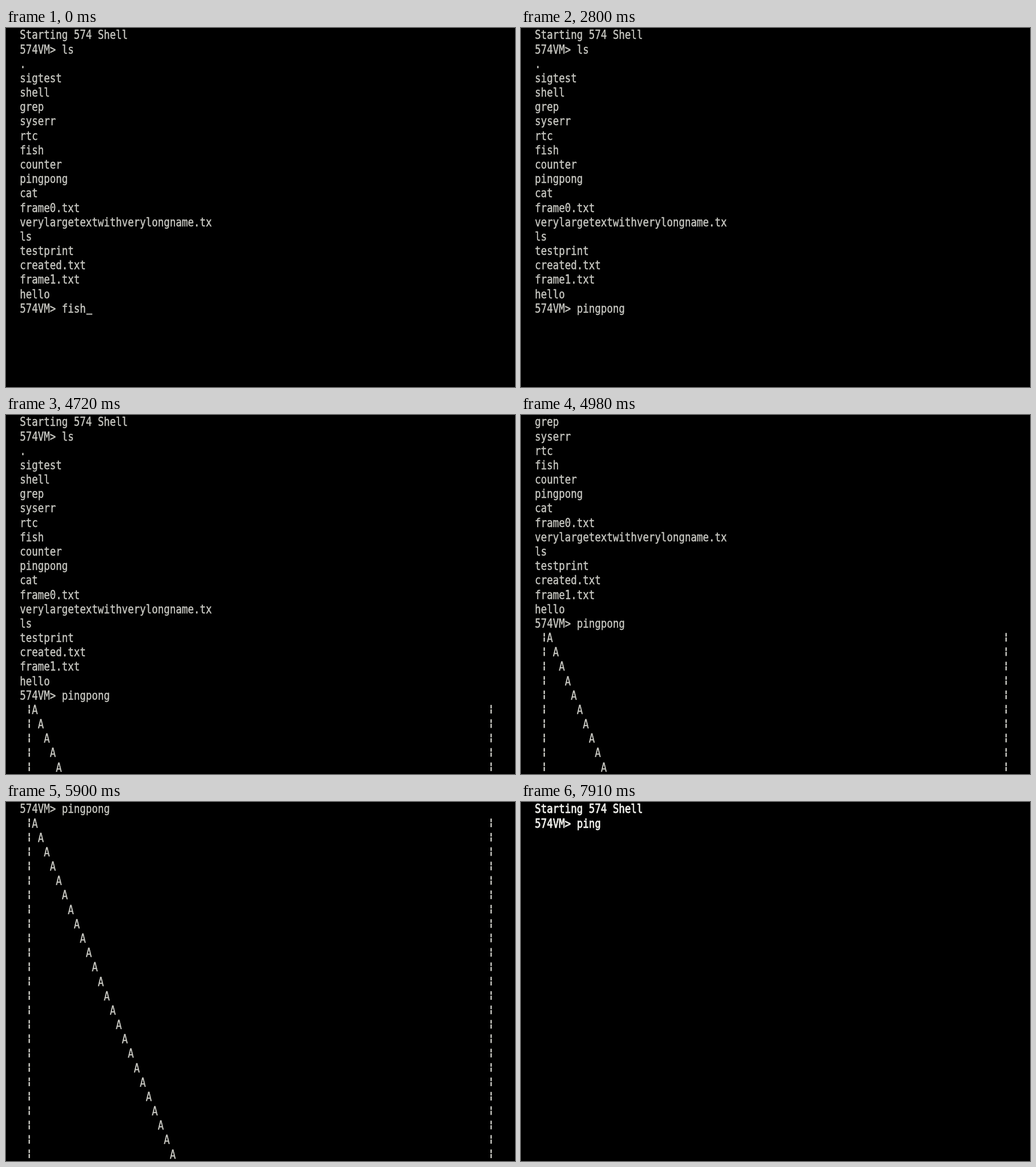
These frames come from a looping animation (891x628 px, 8000 ms). An HTML page with a canvas:

```html
<!DOCTYPE html>
<html lang="en">
<head>
<meta charset="utf-8">
<title>Terminal</title>
<style>
  html, body { margin: 0; width: 100%; height: 100%; overflow: hidden; background: #000; }
  canvas { display: block; }
</style>
</head>
<body>
<canvas id="screen" width="891" height="628"></canvas>
<script>
const ctx = document.getElementById('screen').getContext('2d');

const LOOP = 8000;
const LEFT = 24.3, CELL = 10.5, ROW = 25.17, TOP = 0.6;
const ROWS = 25, TALL = 1.23, DOT = ROW / 16;
const SWITCH = 6460;          // second terminal comes up

const banner = 'Starting 574 Shell';
const prompt = '574VM> ';
const listing = [
  banner, prompt + 'ls', '.', 'sigtest', 'shell', 'grep', 'syserr', 'rtc',
  'fish', 'counter', 'pingpong', 'cat', 'frame0.txt',
  'verylargetextwithverylongname.tx', 'ls', 'testprint', 'created.txt',
  'frame1.txt', 'hello'
];

// [time, text at the prompt]
const firstTyping = [
  [0, 'fish'], [220, 'fis'], [370, 'fi'], [520, 'f'], [670, ''],
  [900, 'p'], [1100, 'pi'], [1300, 'pin'], [1500, 'ping'],
  [1740, 'pingp'], [1940, 'pingpo'], [2140, 'pingpon'], [2340, 'pingpong']
];
const secondTyping = [
  [0, ''], [7240, 'p'], [7440, 'pi'], [7640, 'pin'], [7840, 'ping']
];
// [time, lines printed so far]
const printed = [[4370, 0], [4980, 10.4], [5380, 17.3], [6400, 31.2], [6480, 32]];

const typed = (steps, t) => steps.filter(([at]) => at <= t).pop()[1];

function lineCount(t) {
  if (t < printed[0][0]) return 0;
  const i = printed.findIndex(([at]) => at > t);
  const [t0, n0] = printed[i - 1], [t1, n1] = printed[i];
  return Math.floor(n0 + (n1 - n0) * (t - t0) / (t1 - t0));
}

function text(str, col, row, stroke) {
  ctx.save();
  ctx.translate(LEFT + col * CELL, TOP + row * ROW + 12 * DOT);
  ctx.scale(1, TALL);
  ctx.fillText(str, 0, 0);
  ctx.lineWidth = stroke;
  ctx.strokeText(str, 0, 0);
  ctx.restore();
}

function block(col, row, x, y, w, h) {
  ctx.fillRect(LEFT + col * CELL + x, TOP + row * ROW + y * DOT, w, h * DOT);
}

function wall(col, row) {
  block(col, row, 4.7, 2, 2.4, 4);
  block(col, row, 4.7, 7, 2.4, 4.6);
}

function setColor(color) {
  ctx.fillStyle = ctx.strokeStyle = color;
}

function drawShell(t) {
  setColor('#c9c9c3');
  const command = prompt + typed(firstTyping, t);
  const lines = [...listing, command];
  const count = lineCount(t);
  const scroll = Math.max(0, lines.length + count - ROWS);

  lines.slice(scroll).forEach((line, row) => text(line, 0, row, 0.35));
  for (let n = 0; n < count; n++) {
    const row = lines.length + n - scroll;
    if (row < 0) continue;
    wall(1, row);
    text('A', 2 + n, row, 0.35);
    wall(78, row);
  }

  const blink = (t / 533.3 + 0.28) % 1 < 0.5;
  if (blink && t < printed[0][0]) block(command.length, listing.length, 0.8, 13.2, CELL, 1.2);
}

function drawSecondShell(t) {
  setColor('#f0f0ec');
  text(banner, 0, 0, 0.7);
  text(prompt + typed(secondTyping, t), 0, 1, 0.7);
}

function draw(t) {
  ctx.fillStyle = '#000';
  ctx.fillRect(0, 0, 891, 628);
  ctx.font = '17.44px "DejaVu Sans Mono", monospace';
  ctx.lineJoin = 'round';
  if (t < SWITCH) drawShell(t);
  else drawSecondShell(t);
}

const start = performance.now();
function tick() {
  draw((performance.now() - start) % LOOP);
  requestAnimationFrame(tick);
}
tick();
</script>
</body>
</html>
```
